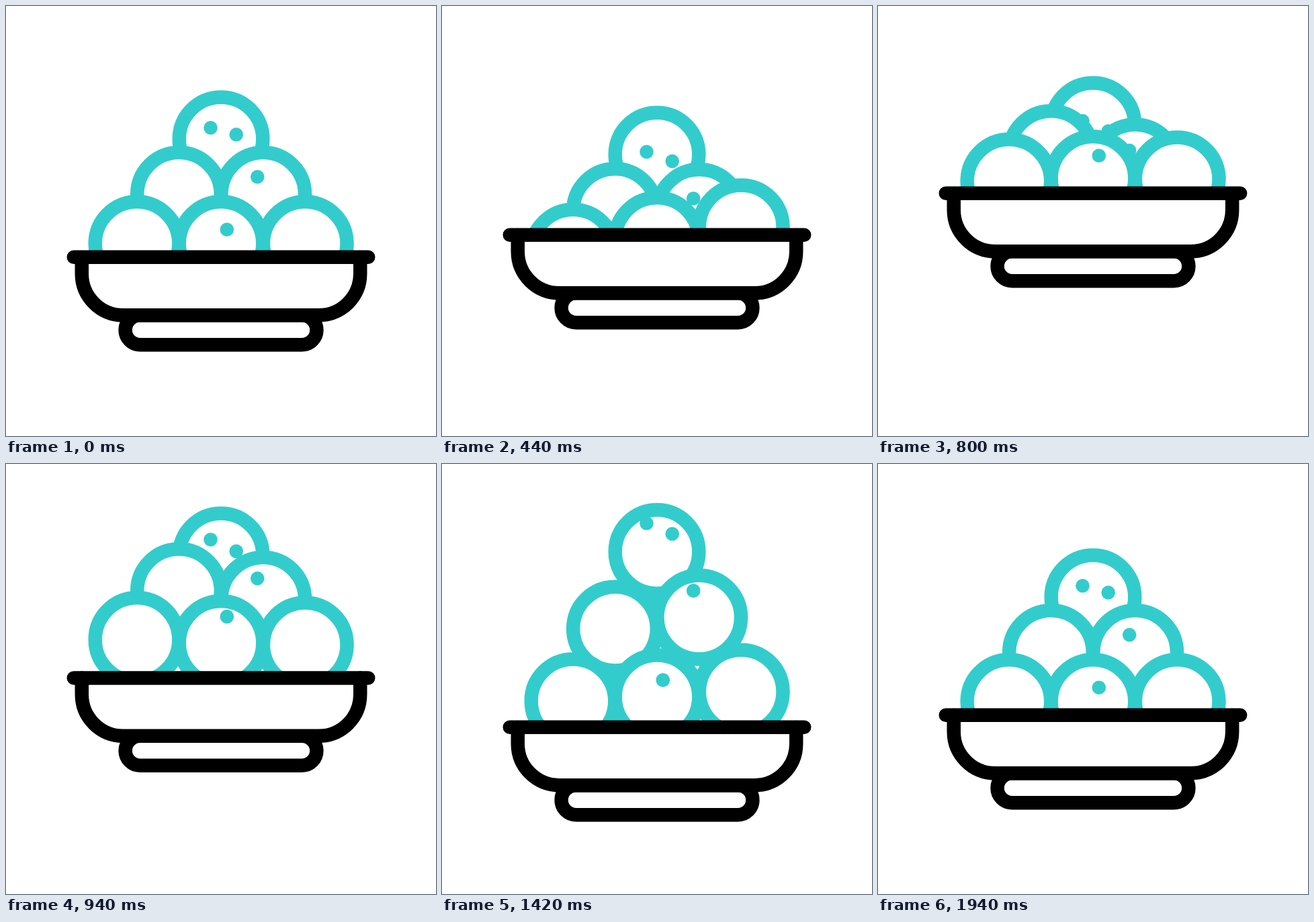
An HTML page for the animation above (2.1 s loop, 640x640 px).

```html
<!DOCTYPE html>
<html lang="en">
<head>
<meta charset="utf-8">
<title>Bowl of bouncing balls</title>
<style>
  html, body { margin: 0; width: 100%; height: 100%; overflow: hidden; background: #fff; }
  svg { display: block; width: 100%; height: 100%; }
  .ball { fill: #fff; stroke: #3cc; stroke-width: 20.5; }
  .dot { fill: #3cc; }
  .bowl { fill: #fff; stroke: #000; stroke-width: 20.5; stroke-linecap: round; }
</style>
</head>
<body>
<svg viewBox="0 0 640 640">
  <clipPath id="aboveRim"><rect id="clip" y="-266" width="640" height="640"/></clipPath>
  <g id="balls" clip-path="url(#aboveRim)"></g>
  <g id="bowl" class="bowl">
    <rect x="177.6" y="460.2" width="284.8" height="44" rx="22"/>
    <path d="M112.8 374V398.5A61.7 61.7 0 0 0 174.5 460.2H465.5A61.7 61.7 0 0 0 527.2 398.5V374"/>
    <path d="M100.8 373.8H539.2"/>
  </g>
</svg>
<script>
const LOOP = 2100, STEP = 20;

// x, y, then [time, offset] poses; every part starts and ends at offset 0
const BALLS = [
  { x: 320, y: 198, path: [[543, 25.5], [1155, -97], [1879, 0]], dots: [
    { x: 304.5, y: 181.2, path: [[580, 42], [1178, -128], [1881, 0]] },
    { x: 342.7, y: 191.4, path: [[575, 46], [1189, -122], [1847, 0]] }] },
  { x: 257.5, y: 280.3, path: [[404, 25.5], [1018, -97], [1696, 0]] },
  { x: 382.7, y: 280.3, path: [[473, 25.5], [1089, -97], [1786, 0]], dots: [
    { x: 374.2, y: 254.2, path: [[480, 33], [1125, -113], [1786, 0]] }] },
  { x: 195, y: 353.5, path: [[330, 25.5], [860, -97], [1448, 0]] },
  { x: 445.2, y: 353.5, path: [[208, 25.5], [738, -97], [1640, 0]] },
  { x: 320, y: 353.5, path: [[264, 25.5], [794, -97], [1539, 0]], dots: [
    { x: 328.8, y: 332.8, path: [[300, 51], [835, -112], [1562, 0]] }] }
];
const BOWL = [[160, 27.5], [740, -100], [1242, 27.5], [1690, 0]];

const byId = id => document.getElementById(id);
const movers = [];

function addCircle(part, cls, r) {
  const el = document.createElementNS("http://www.w3.org/2000/svg", "circle");
  el.setAttribute("class", cls);
  el.setAttribute("cx", part.x);
  el.setAttribute("cy", part.y);
  el.setAttribute("r", r);
  byId("balls").append(el);
  movers.push([el, part.path]);
}

for (const ball of BALLS) {
  addCircle(ball, "ball", 62.3);
  for (const dot of ball.dots || []) addCircle(dot, "dot", 10.3);
}
movers.push([byId("bowl"), BOWL], [byId("clip"), BOWL]);

const smooth = u => u * u * (3 - 2 * u);

function offsetAt(path, t) {
  let [t0, y0] = [0, 0];
  for (const [t1, y1] of path) {
    if (t < t1) return y0 + (y1 - y0) * smooth((t - t0) / (t1 - t0));
    [t0, y0] = [t1, y1];
  }
  return y0;
}

function draw(now) {
  const t = Math.floor((now % LOOP) / STEP) * STEP;
  for (const [el, path] of movers)
    el.setAttribute("transform", `translate(0 ${offsetAt(path, t).toFixed(2)})`);
}

const start = performance.now();
function tick() {
  draw(performance.now() - start);
  requestAnimationFrame(tick);
}
tick();
</script>
</body>
</html>
```
